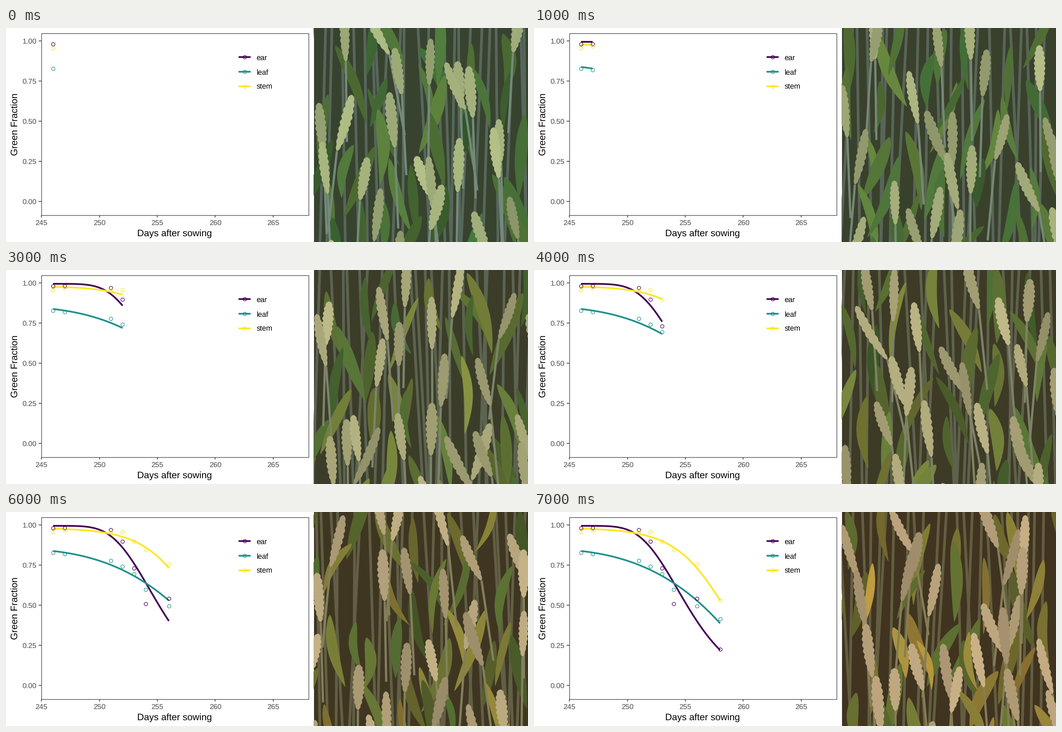
A matplotlib script that plays this animation: 1166 by 480 pixels, repeating every 8 s.

```python
import numpy as np
import matplotlib.pyplot as plt
from matplotlib.animation import FuncAnimation
from matplotlib.collections import PolyCollection
from matplotlib.colors import to_rgb
from matplotlib.patches import Rectangle

W, H, DPI = 1166, 480, 64
PX = 72 / DPI
LEFT, TOP, RIGHT, BOTTOM = 78, 11, 675, 419
PHOTO_X = 687

DAYS = [246, 247, 251, 252, 253, 254, 256, 258]
POINTS = {
    "ear": [.982, .982, .971, .898, .732, .507, .543, .226],
    "leaf": [.827, .820, .777, .743, .695, .596, .494, .414],
    "stem": [.955, .966, .955, .955, .898, .844, .756, .530],
}
COLORS = {"ear": "#440154", "leaf": "#21908C", "stem": "#FDE725"}

plt.rcParams["text.hinting"] = "none"


def ear_fit(day):
    u = day - 254
    return .995 * (1 - np.exp(-np.exp(.03 - .3373 * u - .00423 * u**2)))


def leaf_fit(day):
    u = day - 246
    return .838 - .00833 * u - .001374 * u**2 - .0000888 * u**3


def stem_fit(day):
    u = day - 254
    return .982 / (1 + np.exp(-1.953 + .436 * u + .003 * u**2))


FITS = {"ear": ear_fit, "leaf": leaf_fit, "stem": stem_fit}


def px(day):
    return 78.7 + (np.asarray(day) - 245) * 25.88


def py(frac):
    return 388.3 - np.asarray(frac) * 359.6


def mix(a, b, t):
    return (1 - t) * np.array(to_rgb(a)) + t * np.array(to_rgb(b))


def ribbon(start, end, half, bend=0):
    """Closed outline around a bent centre line; half gives the half width."""
    s = np.linspace(0, 1, 57)
    start, end = np.array(start, float), np.array(end, float)
    d = end - start
    n = np.array([-d[1], d[0]]) / np.hypot(*d)
    mid = start + np.outer(s, d) + np.outer(bend * np.sin(np.pi * s), n)
    off = np.outer(half(s), n)
    return np.vstack([mid + off, (mid - off)[::-1]])


def leaf(base, tip, width, bend):
    return ribbon(tip, base, lambda s: width * np.sin(np.pi * s**.8)**.8, bend)


def stem(start, end, width):
    return ribbon(start, end, lambda s: width + 0 * s)


def ear(tip, base, width):
    def half(s):
        bumps = .75 + .25 * np.abs(np.sin(9 * np.pi * s))
        return width * np.clip(np.sin(np.pi * s**.8), 0, 1)**.5 * bumps

    return ribbon(tip, base, half, (base[0] - tip[0]) * .06)


def spread(rng, cols, rows):
    """Jittered grid over the photo, ordered from back to front."""
    step_x, step_y = (W - PHOTO_X) / cols, (H + 60) / rows
    for i in range(cols * rows):
        row, col = divmod(i, cols)
        yield (PHOTO_X + (col + rng.rand()) * step_x,
               (row + rng.rand()) * step_y - 60)


def scene(k):
    """Flat shapes standing in for the field photo, ripening with k."""
    rng = np.random.RandomState(40 + k)
    ripe = k / (len(DAYS) - 1)
    ear_col = mix("#a3b07c", "#b8a27c", ripe)
    stem_col = mix("#74897a", "#857d56", ripe)
    green = mix("#41703a", "#566c30", ripe)
    gold = mix("#86a045", "#b8963f", ripe)
    shapes, cols = [], []

    def add(shape, col):
        shapes.append(shape)
        cols.append(col)

    add([(PHOTO_X, -1), (W, -1), (W, H), (PHOTO_X, H)],
        mix("#38432f", "#403420", ripe))
    for x in np.linspace(PHOTO_X, W, 24):
        x += rng.uniform(-10, 10)
        add(stem((x, -5), (x + rng.uniform(-30, 30), H + 5), 3), stem_col * .75)
    for x, y in spread(rng, 7, 5):
        base = (x + rng.uniform(-75, 75), y + rng.uniform(110, 190))
        tone = green + (gold - green) * rng.rand() * (.5 + .5 * ripe)
        add(leaf(base, (x, y), rng.uniform(8, 15), rng.uniform(-14, 14)),
            tone * rng.uniform(.75, 1.05))
    for x, y in spread(rng, 6, 4):
        lean, length = rng.normal(8, 25), rng.uniform(95, 130)
        base = (x + lean, y + length)
        add(stem(base, (base[0] + lean * .6, base[1] + 180), 2.5), stem_col)
        add(ear((x, y), base, rng.uniform(11, 14)),
            ear_col * rng.uniform(.85, 1.1))
    return shapes, np.clip(cols, 0, 1)


fig = plt.figure(figsize=(W / DPI, H / DPI), dpi=DPI, facecolor="white")
ax = fig.add_axes([0, 0, 1, 1])
# Whole numbers fall on pixel centres.
ax.set_xlim(-.5, W - .5)
ax.set_ylim(H - .5, -.5)
ax.axis("off")


def label(x, y, text, size, color="black", **kw):
    ax.text(x, y, text, fontsize=size * PX, color=color, va="baseline",
            family="Liberation Sans", **kw)


def line(x, y, color, width, **kw):
    return ax.plot(x, y, color=color, lw=width * PX,
                   solid_capstyle="butt", **kw)[0]


def rings(x, y, color):
    return ax.plot(x, y, "o", mfc="none", mec=color, ms=7.8 * PX,
                   mew=1.2 * PX, zorder=4, snap=False)[0]


# Chart frame, ticks and titles
ax.add_patch(Rectangle((LEFT, TOP), RIGHT - LEFT, BOTTOM - TOP, fill=False,
                       ec="#4d4d4d", lw=1.4 * PX))
for day in range(245, 270, 5):
    line([px(day)] * 2, [BOTTOM, BOTTOM + 5.5], "#333333", 1.5)
    label(px(day), 441.3, str(day), 16.4, "#4d4d4d", ha="center")
for frac in np.linspace(0, 1, 5):
    line([LEFT - 5.5, LEFT], [py(frac)] * 2, "#333333", 1.5)
    label(68, py(frac) + 6, f"{frac:.2f}", 16.4, "#4d4d4d", ha="right")
label(376.3, 465.7, "Days after sowing", 21, ha="center")
label(25.7, 215, "Green Fraction", 21, ha="center", rotation=90,
      rotation_mode="anchor")

# Legend and data series
curves, dots = {}, {}
for i, (name, color) in enumerate(COLORS.items()):
    y = 64.7 + 32.9 * i
    line([519, 546], [y, y], color, 3.8, snap=False)
    rings([532.5], [y], color)
    label(559, y + 6.3, name, 16.5)
    curves[name] = line([], [], color, 3.8, zorder=3)
    dots[name] = rings([], [], color)

field = PolyCollection([], edgecolors="none", zorder=1)
ax.add_collection(field, autolim=False)
field.set_clip_path(Rectangle((PHOTO_X - .5, -.5), W - PHOTO_X, H,
                              transform=ax.transData))
scenes = [scene(k) for k in range(len(DAYS))]


def draw(k):
    span = np.linspace(DAYS[0], DAYS[k], 120)
    for name, fit in FITS.items():
        shown = span if k else span[:0]
        curves[name].set_data(px(shown), py(fit(shown)))
        dots[name].set_data(px(DAYS[:k + 1]), py(POINTS[name][:k + 1]))
    shapes, cols = scenes[k]
    field.set_verts(shapes)
    field.set_facecolor(cols)
    return [field, *curves.values(), *dots.values()]


anim = FuncAnimation(fig, draw, frames=len(DAYS), interval=1000, repeat=True)
plt.show()
```
